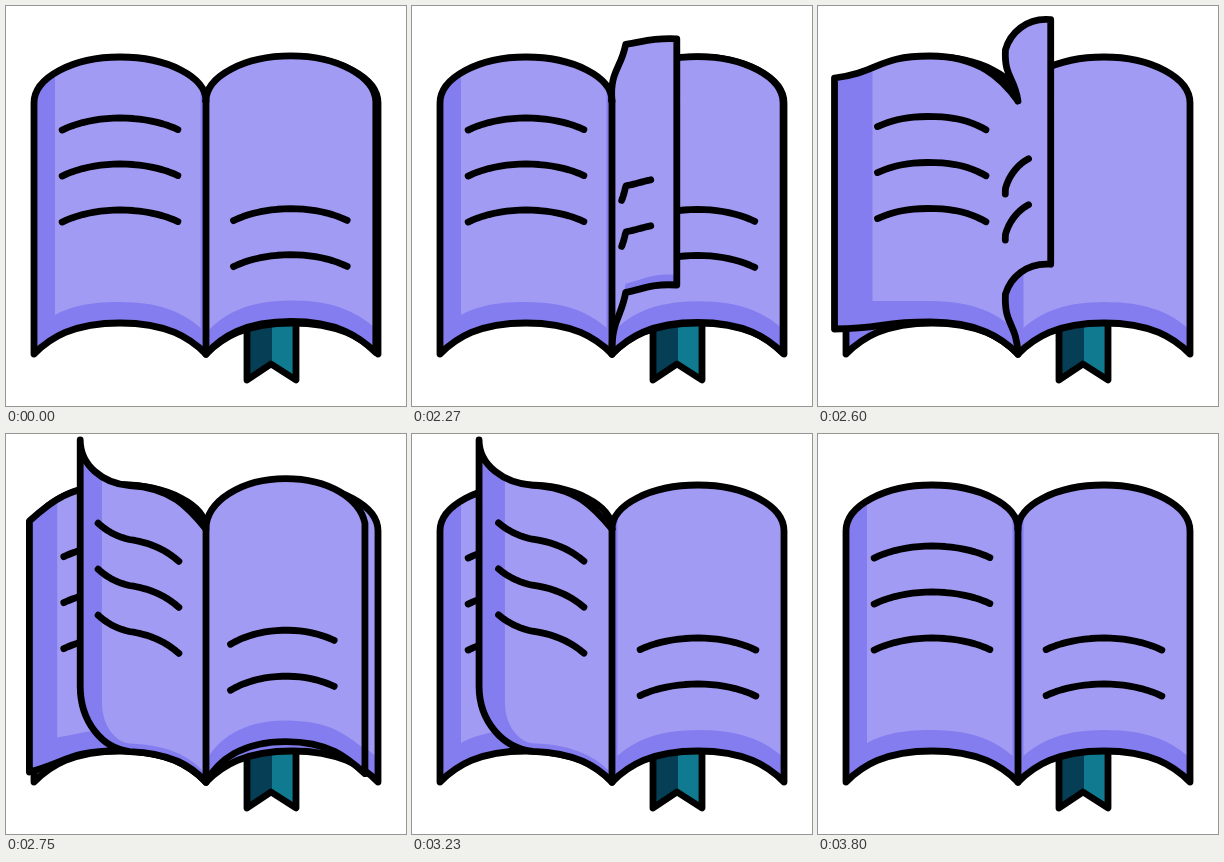
An HTML page with a canvas that plays this animation: 400x400 px, repeating every 3.83 s.

```html
<!DOCTYPE html>
<html lang="en">
<head>
<meta charset="utf-8">
<title>Page-turning book</title>
<style>
html, body { margin: 0; width: 100%; height: 100%; overflow: hidden; background: #fff; }
canvas { display: block; width: 400px; height: 400px; }
</style>
</head>
<body>
<canvas id="stage" width="400" height="400"></canvas>
<script>
const g = document.getElementById('stage').getContext('2d');
const LOOP = 3830, HOLD = 2030, STEP = 30;
const LIGHT = '#a29bf3', DARK = '#847def';
const SPINE = 200, HEAD = 95, HEEL = 348, LINE_GAP = 46;
const RIGHT = 1, LEFT = -1;

// A page hangs from the spine through a mid point to its tip.
// turn: direction in degrees at spine, mid and tip of the top edge
// foot: direction at spine and tip of the bottom edge; drop: page height at mid and tip
// light: bright area's inset from the tip side, and its border's rise at mid and tip
// text: start and end along the top edge (0 spine, 1 mid, 2 tip), distance below it at each
const rightRest = {
  mid: [286, 51], tip: [372, 97], turn: [-90, 0, 90], foot: [-70, 70],
  drop: [266, 251], light: [0, -21, -24], text: [0.53, 1.47, 153, 153]
};
const rightBent = {
  ...rightRest, mid: [263, 28], tip: [325, 69], turn: [-90, 0, 65], foot: [-85, 55],
  drop: [255, 249], text: [0.47, 1.35, 148, 148]
};
const rightUp = {
  mid: [177, 46], tip: [220, 6], turn: [-125, -90, 0], foot: [-105, 0],
  drop: [243, 244], light: [0, 0, 0], text: [1, 1.7, 138, 134]
};
const flipX = ([x, y]) => [2 * SPINE - x, y];
const flipAngles = list => list.map(a => 180 - a);
const leftRest = {
  ...rightRest, mid: flipX(rightRest.mid), tip: flipX(rightRest.tip),
  turn: flipAngles(rightRest.turn), foot: flipAngles(rightRest.foot),
  light: [21, -21, -39], text: [0.53, 1.47, 61, 61]
};
const leftOver = {
  ...leftRest, mid: [112, 50], tip: [16.5, 72], turn: [250, 180, 150], foot: [250, 170],
  light: [38, -21, -28], text: [0.5, 1.53, 60, 61]
};
const leftBent = {
  ...leftRest, mid: [118, 51], tip: [60, 6], turn: [245, 185, 270], foot: [250, 270],
  drop: [266, 246], light: [30, -8, 16], text: [0.47, 1.44, 60, 49]
};
const leftUp = { ...leftBent, mid: [165, 56], tip: [180, 6], light: [-40, -8, 16] };

// Times of each turning page: lift, change of face, bent, overshoot, rest
const turns = [
  [1955, 2330, 2451, 2600, 2850],
  [2241, 2616, 2768, 2930, 3200],
  [2637, 3022, 3243, 3430, 3800]
];
const leftPoses = [leftUp, leftBent, leftOver, leftRest];
const BEND = 0.31;

function mix(a, b, k) {
  const out = {};
  for (const part in a) out[part] = a[part].map((v, i) => v + (b[part][i] - v) * k);
  return out;
}

function rightPose(s) {
  const u = s * s;
  return u < BEND
    ? mix(rightRest, rightBent, u / BEND)
    : mix(rightBent, rightUp, (u - BEND) / (1 - BEND));
}

function leftPose(t, times) {
  const i = t < times[2] ? 1 : t < times[3] ? 2 : 3;
  return mix(leftPoses[i - 1], leftPoses[i], (t - times[i]) / (times[i + 1] - times[i]));
}

// Edges are lists of [x, y, direction]; neighbours are joined by elliptic arcs.
function arc([x0, y0, a0], [x1, y1, a1]) {
  const w = 0.55 * Math.abs(x1 - x0), h = 0.55 * Math.abs(y1 - y0), rad = Math.PI / 180;
  return [
    [x0, y0],
    [x0 + w * Math.cos(a0 * rad), y0 + h * Math.sin(a0 * rad)],
    [x1 - w * Math.cos(a1 * rad), y1 - h * Math.sin(a1 * rad)],
    [x1, y1]
  ];
}

function trace(path, edge) {
  path.lineTo(edge[0][0], edge[0][1]);
  for (let i = 1; i < edge.length; i++) {
    path.bezierCurveTo(...arc(edge[i - 1], edge[i]).slice(1).flat());
  }
}

function pointAt(edge, u) {
  const i = u < 1 ? 0 : 1, t = u - i, r = 1 - t;
  const weights = [r * r * r, 3 * r * r * t, 3 * r * t * t, t * t * t];
  const pts = arc(edge[i], edge[i + 1]);
  return [0, 1].map(axis => pts.reduce((sum, p, n) => sum + p[axis] * weights[n], 0));
}

const reversed = edge => edge.map(([x, y, a]) => [x, y, a + 180]).reverse();

function drawLines(edge, [from, to, dropFrom, dropTo], count) {
  for (let n = 0; n < count; n++) {
    g.beginPath();
    for (let k = 0; k <= 1.001; k += 0.05) {
      const [x, y] = pointAt(edge, from + (to - from) * k);
      g.lineTo(x, y + dropFrom + (dropTo - dropFrom) * k + n * LINE_GAP);
    }
    g.stroke();
  }
}

function drawPage({ mid, tip, turn, foot, drop, light, text }, side, lines, isBase) {
  const [mx, my] = mid, [tx, ty] = tip, [inset, rise, tipRise] = light;
  const footY = my + drop[0], cornerY = ty + drop[1];
  const top = [[SPINE, HEAD, turn[0]], [mx, my, turn[1]], [tx, ty, turn[2]]];
  const bottom = [[SPINE, HEEL, foot[0]], [mx, footY, turn[1]], [tx, cornerY, foot[1]]];
  const border = [
    [SPINE, HEEL + rise, foot[0]],
    [mx, footY + rise, turn[1]],
    [tx + inset, cornerY + tipRise, foot[1]]
  ];

  const page = new Path2D();
  trace(page, top);
  trace(page, reversed(bottom));
  g.fillStyle = DARK;
  g.fill(page);

  g.save();
  g.clip(page);
  const bright = new Path2D(), far = SPINE - side * 300;
  bright.moveTo(tx + inset, -300);
  trace(bright, reversed(border));
  bright.lineTo(far, HEEL + rise);
  bright.lineTo(far, -300);
  g.fillStyle = LIGHT;
  g.fill(bright);
  if (isBase) {
    g.fillStyle = DARK;
    g.fillRect(SPINE - 5.5, 0, 11, HEEL);
  }
  g.restore();

  drawLines(top, text, lines);
  g.stroke(page);
}

function drawBookmark() {
  const ribbon = new Path2D('M241 310V374L265 358L290 374V310Z');
  g.save();
  g.clip(ribbon);
  g.fillStyle = '#053e55';
  g.fillRect(241, 310, 25, 64);
  g.fillStyle = '#107b90';
  g.fillRect(266, 310, 24, 64);
  g.restore();
  g.stroke(ribbon);
}

function draw(t) {
  g.fillStyle = '#fff';
  g.fillRect(0, 0, 400, 400);
  g.lineWidth = 6.8;
  g.lineCap = g.lineJoin = 'round';

  drawBookmark();
  drawPage(leftRest, LEFT, 3, true);
  drawPage(rightRest, RIGHT, t > turns[2][0] ? 2 : 0, true);

  for (const times of turns) {
    if (t >= times[1] && t < times[4]) drawPage(leftPose(t, times), LEFT, 3);
  }
  let spineShown = true;
  for (const [lift, flip] of [...turns].reverse()) {
    if (t < lift || t >= flip) continue;
    const s = (t - lift) / (flip - lift);
    drawPage(rightPose(s), RIGHT, 2);
    if (s > 0.84) spineShown = false;
  }
  if (spineShown) g.stroke(new Path2D(`M${SPINE} ${HEAD}V${HEEL}`));
}

function tick() {
  const t = performance.now() % LOOP;
  draw(t < HOLD ? HOLD - STEP : HOLD + Math.floor((t - HOLD) / STEP) * STEP);
  requestAnimationFrame(tick);
}
tick();
</script>
</body>
</html>
```
